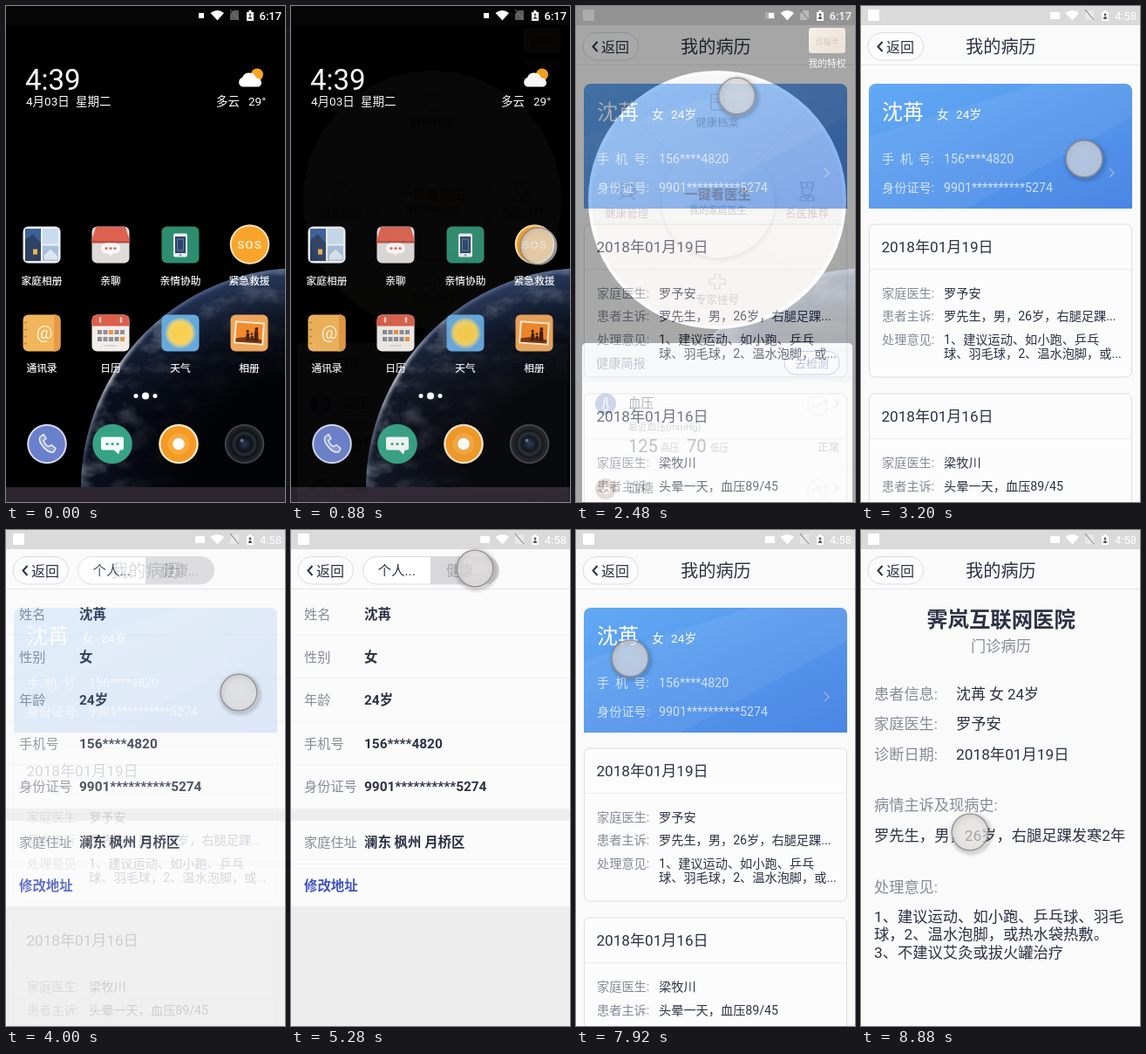
An HTML page for the animation above (8960 ms loop, 320 px wide and 568 px high).

```html
<!DOCTYPE html>
<html lang="zh-CN">
<head>
<meta charset="utf-8">
<title>健康应用演示</title>
<style>
html, body { margin: 0; width: 100%; height: 100%; overflow: hidden; background: #000; }
svg { display: block; }
text { font-family: Roboto, "Noto Sans CJK SC", "Noto Sans CJK", sans-serif; white-space: pre; }
.mid { text-anchor: middle; }
.b { font-weight: 700; }
.med { font-weight: 500; }
.ink { fill: #2c3245; }
.mute { fill: #878b98; }
.link { fill: #4355bd; }
.line { stroke: #ececef; }
.thin { fill: none; stroke-width: 1.2; stroke-linecap: round; stroke-linejoin: round; }

/* one 8960 ms loop, all parts share the clock */
#home, #health, #list, #info, #body, #detail, #touch { animation: 8960ms step-end infinite; }
#home { animation-name: home; }
#health { animation-name: health; }
#list { animation-name: list; }
#info { animation-name: info; }
#body { animation-name: body; }
#detail { animation-name: detail; }
#touch { animation-name: touch; }

@keyframes home {
  0% { opacity: 1; } 9.8% { opacity: .97; } 10.7% { opacity: .65; }
  11.6% { opacity: .3; } 12.47%, 100% { opacity: 0; }
}
@keyframes health {
  0% { opacity: 0; } 9.8% { opacity: .035; } 10.7% { opacity: .4; }
  11.6% { opacity: .75; } 12.47%, 100% { opacity: 1; }
}
@keyframes list {
  0% { opacity: 0; }
  24.08% { opacity: 0; animation-timing-function: steps(6); }
  29.43%, 100% { opacity: 1; }
}
@keyframes info {
  0% { opacity: 0; }
  40.15% { opacity: 0; animation-timing-function: steps(6); }
  45.5% { opacity: 1; }
  68%, 100% { opacity: 0; }
}
@keyframes body {
  0% { opacity: 0; } 63.36% { opacity: .35; } 65.15% { opacity: .75; } 66.93% { opacity: 1; }
  83% { opacity: .5; } 84.8%, 100% { opacity: 0; }
}
@keyframes detail {
  0% { opacity: 0; } 96.4% { opacity: .3; } 98.2% { opacity: .7; } 99.08%, 100% { opacity: 1; }
}
@keyframes touch {
  0% { opacity: 0; transform: translate(284px, 275px); }
  1.76% { opacity: .2; } 2.65% { opacity: .4; } 3.55% { opacity: .6; } 4.44% { opacity: .8; }
  5.33% { opacity: 1; transform: translate(284px, 275px); }
  14.26% { transform: translate(272px, 255px); }
  15.15% { transform: translate(245px, 207px); }
  16.05% { transform: translate(215px, 155px); }
  16.94% { transform: translate(193px, 117px); }
  18.73% { transform: translate(184.5px, 103px); }
  35.69% { transform: translate(256px, 175px); }
  36.58% { transform: translate(267px, 186px); }
  53.55% { transform: translate(234px, 76px); }
  54.44% { transform: translate(224px, 44px); }
  58.01% { transform: translate(217px, 44px); }
  58.9% { transform: translate(211px, 44px); }
  74.98% { transform: translate(189px, 43.5px); }
  75.87% { transform: translate(138px, 42px); }
  76.76% { transform: translate(83px, 41px); }
  77.66% { transform: translate(43px, 40px); }
  78.55% { transform: translate(28px, 40px); }
  88.37% { transform: translate(62px, 147px); }
  89.26% { transform: translate(106px, 285px); }
  91.05%, 100% { opacity: 1; transform: translate(125px, 346px); }
}
</style>
</head>
<body>
<svg width="320" height="568" viewBox="0 0 320 568">
<defs>
  <linearGradient id="sea" x1=".7" y1="0" x2=".25" y2=".6">
    <stop offset="0" stop-color="#2c4066"/><stop offset=".5" stop-color="#1f2f52"/><stop offset="1" stop-color="#0c1222"/>
  </linearGradient>
  <radialGradient id="night">
    <stop offset=".5" stop-color="#020306"/><stop offset=".75" stop-color="#03050a" stop-opacity=".8"/><stop offset=".93" stop-color="#05080f" stop-opacity=".3"/><stop offset="1" stop-color="#05080f" stop-opacity=".1"/>
  </radialGradient>
  <linearGradient id="limb" x1="0" y1="1" x2="1" y2="0">
    <stop offset=".26" stop-color="#7d96cc" stop-opacity=".25"/><stop offset=".34" stop-color="#c5d2ee" stop-opacity=".6"/><stop offset=".42" stop-color="#fff"/><stop offset=".52" stop-color="#b5c4e2" stop-opacity=".5"/><stop offset=".75" stop-color="#8ba2c8" stop-opacity=".35"/>
  </linearGradient>
  <linearGradient id="sky" x1="0" y1="0" x2="1" y2="1"><stop offset="0" stop-color="#62a9f4"/><stop offset="1" stop-color="#4a86e4"/></linearGradient>
  <linearGradient id="gold" x1="0" y1="0" x2="1" y2="1"><stop offset="0" stop-color="#eedcc0"/><stop offset="1" stop-color="#cfb089"/></linearGradient>
  <linearGradient id="cream" x1="0" y1="0" x2="0" y2="1"><stop offset="0" stop-color="#f4f0ee"/><stop offset="1" stop-color="#ece4e2"/></linearGradient>
  <radialGradient id="sun"><stop offset=".4" stop-color="#f8cf4e"/><stop offset=".75" stop-color="#f3d266"/><stop offset="1" stop-color="#cfcf96" stop-opacity=".3"/></radialGradient>
  <radialGradient id="lens"><stop offset="0" stop-color="#2c3a55"/><stop offset=".4" stop-color="#0e121a"/><stop offset=".6" stop-color="#2a2f38"/><stop offset=".7" stop-color="#101216"/><stop offset="1" stop-color="#26282d"/></radialGradient>
  <radialGradient id="tip"><stop offset="0" stop-color="#e2dfde" stop-opacity=".66"/><stop offset="1" stop-color="#d8d5d4" stop-opacity=".72"/></radialGradient>
  <filter id="clouds" x="0" y="0" width="1" height="1">
    <feTurbulence type="fractalNoise" baseFrequency=".03 .05" numOctaves="5" seed="4"/>
    <feColorMatrix values="0 0 0 0 .6  0 0 0 0 .66  0 0 0 0 .78  3 0 0 0 -1.4"/>
  </filter>
  <filter id="soft" x="-.3" y="-.3" width="1.6" height="1.6"><feGaussianBlur stdDeviation="2"/></filter>
  <clipPath id="globe"><circle cx="338" cy="552" r="252"/></clipPath>
  <clipPath id="pill"><rect x="82" y="30" width="157" height="32" rx="16"/></clipPath>
  <rect id="tile" x="-21.5" y="-21" width="43" height="42" rx="6"/>

  <g id="signals">
    <path d="M234.500 8Q242.500 2 250 8L242.500 16.500Z"/>
    <path d="M267 5v11h-10v-7l4-4Z" opacity=".35"/>
    <path d="M257 4l10 12" stroke="#777"/>
    <path d="M276 7h2.500v-2h3v2h2.500v10h-8Z"/>
    <path d="M278 15q0-3 2-3t2 3Z" fill="#555"/><circle cx="280" cy="10" r="1.400" fill="#555"/>
  </g>
  <g id="back">
    <rect x="8" y="30.500" width="63.500" height="31.500" rx="15.700" fill="#fcfcfc" stroke="#dcdce0"/>
    <path d="M24.500 41l-5 5.500 5 5.500" fill="none" stroke="#2c3245" stroke-width="2"/>
    <text x="29" y="53" font-size="16" class="ink">返回</text>
  </g>
  <g id="bar">
    <path d="M0 22h320v45H0Z" fill="#fafafa"/><path d="M0 67.500h320" stroke="#e6e6e9"/>
    <use href="#back"/>
  </g>
  <g id="titled">
    <use href="#bar"/><text x="120" y="53.500" font-size="20.200" class="ink">我的病历</text>
  </g>
  <g id="stamp" class="mid" transform="rotate(-20)" opacity=".3">
    <circle r="11.500" fill="none" stroke="#999"/><rect x="-15" y="-4.500" width="30" height="9" fill="#fff"/>
    <text y="2.500" font-size="7" fill="#888">示例数据</text>
  </g>
  <path id="next" d="M0-5l5 5-5 5" fill="none" stroke="#c9c9cf" stroke-width="1.300"/>
</defs>

<!-- wallpaper and dark status bar -->
<rect width="320" height="568"/>
<g clip-path="url(#globe)">
  <rect x="80" y="290" width="240" height="278" fill="url(#sea)"/>
  <rect x="80" y="290" width="240" height="278" filter="url(#clouds)" opacity=".4"/>
  <circle cx="338" cy="552" r="252" fill="url(#night)"/>
  <circle cx="338" cy="552" r="252" fill="none" stroke="url(#limb)" stroke-width="5" filter="url(#soft)"/>
</g>
<rect width="320" height="22" fill="#060606"/>
<g fill="#fff">
  <rect x="221" y="8" width="6" height="6"/>
  <use href="#signals"/><text x="290.500" y="15.500" font-size="13" class="med">6:17</text>
</g>

<g id="home">
  <g fill="#fff">
    <text x="22" y="95.500" font-size="33">4:39</text>
    <g font-size="13.500">
      <text x="23" y="114">4月03日</text><text x="80" y="114">星期二</text>
      <text x="241" y="114">多云</text><text x="278" y="114">29°</text>
    </g>
    <circle cx="288" cy="78.500" r="7" fill="#f6a623"/>
    <path d="M271 92.500a5.500 5.500 0 0 1 0-10.500 8.500 8.500 0 0 1 16 .5 5.300 5.300 0 0 1 3 10Z"/>
    <g class="mid med" font-size="11.700" stroke="#fff" stroke-width=".2">
      <text x="41" y="318.500">家庭相册</text><text x="120" y="318.500">亲聊</text>
      <text x="200" y="318.500">亲情协助</text><text x="279" y="318.500">紧急救援</text>
      <text x="41" y="419">通讯录</text><text x="120" y="419">日历</text>
      <text x="200" y="419">天气</text><text x="279" y="419">相册</text>
    </g>
    <circle cx="149" cy="446.500" r="2.500"/><circle cx="160" cy="446.500" r="4"/><circle cx="171" cy="446.500" r="2.500"/>
  </g>

  <g transform="translate(41 273.500)">
    <use href="#tile" fill="#eef1f5"/>
    <path d="M-19-18.500H-1V-1h-18Z" fill="#3c6199"/><path d="M1-18.500h18V-1H1Z" fill="#c9dcef"/>
    <path d="M-19 1H-1v17.500h-18Z" fill="#24456f"/><path d="M1 1h18v17.500H1Z" fill="#a9c0da"/>
    <path d="M-19-6l9-6 9 10v20.500h-18Z" fill="#2f4266"/><path d="M-10 5h5v6h-5Z" fill="#efb44c"/><path d="M3 12l7-7 8 8v4H3Z" fill="#dbe6ee"/>
  </g>
  <g transform="translate(120 273.500)">
    <use href="#tile" fill="#dedbd8"/>
    <path d="M-17-20.500h34l5 16h-44Z" fill="#dd6350"/><path d="M-22-4.500h44v2.500h-44Z" fill="#b94e3f"/>
    <rect x="-11" y="-2" width="22" height="12" rx="6" fill="#fafafa"/><path d="M-3 9h6l-3 4Z" fill="#fafafa"/>
    <g fill="#df6a50"><circle cx="-5" cy="4" r="1.600"/><circle cy="4" r="1.600"/><circle cx="5" cy="4" r="1.600"/></g>
  </g>
  <g transform="translate(200 273.500)">
    <use href="#tile" fill="#2e8d6f"/>
    <rect x="-8" y="-13" width="16" height="27" rx="2" fill="#e8eef0"/><rect x="-6" y="-9.500" width="12" height="19" fill="#2d4668"/>
    <rect x="-3.500" y="-6.500" width="7" height="13" fill="none" stroke="#5f7ea8"/><circle cy="11.700" r="1.200" fill="#8a9aa8"/>
  </g>
  <g transform="translate(279.500 273)">
    <circle r="22.800" fill="#fbe3bd"/><circle r="20.800" fill="#f9a52c"/>
    <text y="4.800" class="mid med" font-size="13.500" fill="#fdf0d6" letter-spacing="1">SOS</text>
  </g>
  <g transform="translate(41 374.500)">
    <use href="#tile" fill="#f1b55c"/><path d="M-20-12h3m-3 8h3m-3 8h3m-3 8h3" stroke="#c08a3c" stroke-width="1.500"/>
    <path d="M14-21h1.500a6 6 0 0 1 6 6v30a6 6 0 0 1-6 6H14Z" fill="#e59a44"/>
    <text x="3" y="6.500" class="mid" font-size="21" fill="#fff4df">@</text>
  </g>
  <g transform="translate(120 374.500)">
    <use href="#tile" fill="#f1eeea"/><path d="M-21.500-8v-7a6 6 0 0 1 6-6h31a6 6 0 0 1 6 6v7Z" fill="#dc5f4c"/>
    <path d="M-12-17v4m24-4v4" stroke="#f3d0c8" stroke-width="2.500" stroke-linecap="round"/>
    <path d="M-15-1h31M-15 7h31" stroke="#8f9096" stroke-width="5" stroke-dasharray="5 1.500"/>
    <path d="M-2-1h5m8 8h5" stroke="#ef9440" stroke-width="5"/><path d="M-7 14.500h14" stroke="#c5c2be"/>
  </g>
  <g transform="translate(200 374.500)"><use href="#tile" fill="#66a9dc"/><circle r="17.500" fill="url(#sun)"/></g>
  <g transform="translate(279 374.500)">
    <use href="#tile" fill="#eda65c"/>
    <g transform="rotate(4)">
      <rect x="-17" y="-13" width="34" height="26" fill="#fbe9cf"/><rect x="-15" y="-11" width="30" height="22" fill="#f28a2e"/>
      <path d="M-15 7q15-4 30 0v4h-30Z" fill="#7a3a16"/>
      <g fill="#4a2310"><circle cx="-2" cy="-2" r="1.600"/><circle cx="8" cy="-5" r="2"/><circle cx="3" cy="1" r="1.400"/><path d="M-4 9l1-9h3l1 9Zm6 0v-6h3v6Zm4 0V-3h4l1 12Z"/></g>
    </g>
  </g>

  <g transform="translate(47 501.500)">
    <circle r="22.800" fill="#d5daee"/><circle r="20.800" fill="#6b80cd"/>
    <path d="M-8-8c-3 6 9 20 16 17l2-4-5-4-3 2c-3-1-5-4-6-7l3-2-3-5Z" fill="#8b9cdb" stroke="#f1f3fc" stroke-width="1.500" stroke-linejoin="round"/>
  </g>
  <g transform="translate(122 501.500)">
    <circle r="22.800" fill="#35a384"/><rect x="-13" y="-8" width="26" height="15" rx="2" fill="#f4faf8"/><path d="M1 6h8l-2 6Z" fill="#f4faf8"/>
    <g fill="#35a384"><circle cx="-6" r="1.600"/><circle r="1.600"/><circle cx="6" r="1.600"/></g>
  </g>
  <g transform="translate(198 501.500)"><circle r="22.800" fill="#fbe9cd"/><circle r="20.500" fill="#f59a23"/><circle r="12.500" fill="#f7a93f"/><circle r="6.800" fill="#fff"/></g>
  <g transform="translate(273.500 501.500)"><circle r="22.800" fill="#41444b"/><circle r="21" fill="url(#lens)"/><circle cx="-3" cy="-4" r="2" fill="#7f93b5" opacity=".7"/></g>
  <path d="M0 551h320v17H0Z" fill="#2d2631"/>
</g>

<g id="health">
  <rect x="267" y="25" width="42" height="29" rx="3" fill="url(#gold)"/>
  <g class="mid"><text x="288" y="44" font-size="9" fill="#8a5a2c">诊福卡</text><text x="288" y="70" font-size="10.800" fill="#fff">我的特权</text></g>
  <g transform="translate(162 222)">
    <circle r="146" fill="url(#cream)" stroke="#fff" stroke-width="4"/>
    <path d="M-103-103L103 103M-103 103L103-103" stroke="#e0d7d4"/>
    <circle cx="1.500" cy="4" r="65.500" fill="#9a837a" opacity=".4" filter="url(#soft)"/>
    <circle r="65" cx="1" cy="1" fill="#f3eeeb"/>
  </g>
  <g class="mid">
    <text x="162.500" y="221" font-size="15.300" class="b" fill="#b8691f">一键看医生</text>
    <text x="163" y="238" font-size="10.900" fill="#7b706d">我的家庭医生</text>
    <g font-size="12.500" fill="#877973">
      <text x="162" y="138">健康档案</text><text x="58" y="242">健康管理</text>
      <text x="265" y="242">名医推荐</text><text x="162" y="341">专家挂号</text>
    </g>
  </g>
  <g class="thin" stroke="#a6958d">
    <path d="M155 101h15v18h-15ZM158 106h8M158 110h5"/>
    <circle cx="58" cy="210" r="8"/><path d="M50 207q9 2 12-4 1 4 4 5M48 208v5M68 208v5q0 4-7 4M49 222q2-3 6-4M61 218q5 1 6 4"/>
    <path d="M259 208l-1.500-6h15l-1.500 6ZM265 203.500v3M259.500 208v3a5.500 5.500 0 0 0 11 0v-3M257 223v-3q1-3 8-3t8 3v3ZM262 218l3 3 3-3"/>
    <path d="M159 307h6v5.500h6v6h-6v5.500h-6v-5.500h-6v-6h6Z"/>
  </g>
  <path d="M7 568V391a5 5 0 0 1 5-5h300a5 5 0 0 1 5 5v177Z" fill="#fcfcfd"/>
  <path d="M7 431v-40a5 5 0 0 1 5-5h300a5 5 0 0 1 5 5v40Z" fill="#eeeff7"/>
  <text x="23" y="414" font-size="14.200" fill="#555a70">健康简报</text>
  <rect x="239" y="395.500" width="63" height="26.500" rx="13" fill="#f5f6fc" stroke="#6b78b6"/>
  <text x="270.500" y="413.500" class="mid" font-size="13" fill="#3d4fa3">去检测</text>
  <circle cx="34" cy="455.500" r="12" fill="#7489c1"/><circle cx="34" cy="553" r="12" fill="#b59c8a"/>
  <path d="M32.500 457v-7a1.500 1.500 0 0 1 3 0v7a3 3 0 1 1-3 0Z" class="thin" stroke="#fff"/>
  <path d="M34 546.500q8 8 3 11.500-3 1.500-6 0-5-3.500 3-11.500Z" fill="#f7f2ee"/><circle cx="34" cy="555" r="1.300" fill="#b59c8a"/>
  <g font-size="14.500" class="med" fill="#272a34"><text x="60" y="460">血压</text><text x="60" y="557">血糖</text></g>
  <use href="#stamp" transform="translate(277 458)"/><use href="#stamp" transform="translate(277 554)"/>
  <use href="#next" transform="translate(296 455)"/><use href="#next" transform="translate(296 552)"/>
  <g fill="#8c8c94">
    <g font-size="10.800"><text x="60" y="486">最近血压(mmHg)</text><text x="97" y="510">高压</text><text x="154" y="510">低压</text></g>
    <text x="277" y="510" font-size="12.500">正常</text>
    <g font-size="20" fill="#4a4b58"><text x="60" y="511">125</text><text x="127" y="511">70</text></g>
  </g>
  <path d="M56 530.500h261" class="line"/>
</g>

<g id="list">
  <rect width="320" height="568" fill="#fafafa"/>
  <rect width="320" height="22" fill="#dadadb"/>
  <g fill="#fff"><rect x="8" y="4" width="13" height="13" rx="1"/><rect x="217" y="7" width="11" height="8" rx="1"/><use href="#signals"/><text x="291" y="15.500" font-size="13">4:58</text></g>
  <use href="#titled"/>
  <path d="M9 232V97a8 8 0 0 1 8-8h286a8 8 0 0 1 8 8v135Z" fill="url(#sky)"/>
  <path d="M9 150L200 89h103a8 8 0 0 1 8 8v30L120 232H9Z" fill="#fff" opacity=".06"/>
  <g fill="#fff">
    <text x="24" y="130" font-size="24">沈苒</text>
    <text x="87" y="129" font-size="13.700">女</text><text x="109" y="129" font-size="13.700">24岁</text>
    <g font-size="14.200" opacity=".72">
      <text x="24" y="180" word-spacing="3.300">手 机 号:</text><text x="24" y="213">身份证号:</text>
      <text x="95" y="180">156****4820</text><text x="95" y="213">9901**********5274</text>
    </g>
  </g>
  <use href="#next" transform="translate(285 191)" opacity=".7"/>
  <g fill="#fcfcfc" stroke="#dddee3"><rect x="9.500" y="250" width="301" height="175" rx="6"/><rect x="9.500" y="444" width="301" height="180" rx="6"/></g>
  <path d="M10 301.500h300M10 495.500h300" class="line"/>
  <g class="ink" font-size="17.100"><text x="23.500" y="282">2018年01月19日</text><text x="23.500" y="476">2018年01月16日</text></g>
  <g class="mute" font-size="14.200">
    <text x="24" y="333.500">家庭医生:</text><text x="24" y="360">患者主诉:</text><text x="24" y="386.500">处理意见:</text>
    <text x="24" y="528">家庭医生:</text><text x="24" y="554.500">患者主诉:</text>
  </g>
  <g class="ink" font-size="14.200">
    <text x="95" y="333.500">罗予安</text><text x="95" y="360">罗先生，男，26岁，右腿足踝...</text>
    <text x="95" y="386.500">1、建议运动、如小跑、乒乓</text><text x="95" y="403">球、羽毛球，2、温水泡脚，或...</text>
    <text x="95" y="528">梁牧川</text><text x="95" y="554.500">头晕一天，血压89/45</text>
  </g>
</g>

<g id="info">
  <rect y="22" width="320" height="546" fill="#ededed"/>
  <path d="M0 67h320v252H0ZM0 333h320v98H0Z" fill="#fbfbfb"/>
  <use href="#bar"/>
  <g clip-path="url(#pill)"><path d="M82 30h78v32H82Z" fill="#fff"/><path d="M160 30h79v32h-79Z" fill="#d8d8db"/></g>
  <rect x="82.500" y="30.500" width="156" height="31.500" rx="15.700" fill="none" stroke="#dadade"/>
  <g font-size="15.500"><text x="99.500" y="52" class="ink">个人...</text><text x="178" y="52" fill="#a2a3aa">健康...</text></g>
  <path d="M0 120.500h320M0 169.500h320M0 219.500h320M0 268.500h320M0 382.500h320" stroke="#f2f2f3"/>
  <g class="mute" font-size="15.200">
    <text x="15" y="101.500">姓名</text><text x="15" y="151">性别</text><text x="15" y="200">年龄</text>
    <text x="15" y="249.500">手机号</text><text x="15" y="299">身份证号</text><text x="15" y="363">家庭住址</text>
  </g>
  <g class="ink b" font-size="15.400">
    <text x="84" y="101.500">沈苒</text><text x="84" y="151">女</text><text x="84" y="200">24岁</text>
    <text x="84" y="249.500">156****4820</text><text x="84" y="299">9901**********5274</text><text x="84" y="363">澜东 枫州 月桥区</text>
    <text x="15" y="412.500" class="link">修改地址</text>
  </g>
</g>

<g id="body">
  <rect y="22" width="320" height="546" fill="#fbfbfb"/>
  <use href="#bar"/>
  <g clip-path="url(#pill)"><path d="M82 30h79v32H82Z" fill="#d8d8db"/><path d="M161 30h78v32h-78Z" fill="#fff"/></g>
  <rect x="82.500" y="30.500" width="156" height="31.500" rx="15.700" fill="none" stroke="#dadade"/>
  <g font-size="15.500"><text x="99.500" y="52" fill="#a2a3aa">个人...</text><text x="178" y="52" class="ink">健康...</text></g>
  <path d="M0 251h320v9H0ZM0 499h320v9H0Z" fill="#ececec"/>
  <path d="M0 120.500h320M0 310.500h320M0 558.500h320" class="line"/>
  <g class="ink b" font-size="16.100"><text x="15" y="102">一般信息</text><text x="15" y="292">身体情况</text><text x="15" y="540">疾病信息</text></g>
  <g fill="#9c9fa9" font-size="14.200">
    <text x="15" y="150">身高:</text><text x="168" y="150">体重:</text><text x="15" y="208">体质指数:</text>
    <text x="15" y="340">月经周期:</text><text x="15" y="398">月经量:</text><text x="15" y="456">自感症状:</text>
  </g>
  <g class="ink" font-size="16.100">
    <text x="15" y="175">162  cm</text><text x="168" y="175">46  kg</text><text x="15" y="232.500">17.53  kg/㎡</text>
    <text x="15" y="364.500">一般两个月到三个月</text><text x="15" y="422.500">量少</text><text x="15" y="481">正常</text>
  </g>
</g>

<g id="detail">
  <rect y="22" width="320" height="546" fill="#fafafa"/>
  <use href="#titled"/>
  <text x="160.500" y="110.500" class="ink b mid" font-size="24.400">霁岚互联网医院</text>
  <text x="160.500" y="138.500" class="mute mid" font-size="17.200">门诊病历</text>
  <g class="mute" font-size="17.200">
    <text x="15" y="194">患者信息:</text><text x="15" y="228">家庭医生:</text><text x="15" y="262.500">诊断日期:</text>
    <text x="15" y="321">病情主诉及现病史:</text><text x="15" y="414.500">处理意见:</text>
  </g>
  <g class="ink" font-size="17.300">
    <text x="109" y="194" font-size="16.900">沈苒 女 24岁</text><text x="109" y="228">罗予安</text><text x="109" y="262.500">2018年01月19日</text>
    <text x="15" y="355.500">罗先生，男，26岁，右腿足踝发寒2年</text>
    <text x="15" y="448.500">1、建议运动、如小跑、乒乓球、羽毛</text><text x="15" y="469">球，2、温水泡脚，或热水袋热敷。</text>
    <text x="15" y="489.500">3、不建议艾灸或拔火罐治疗</text>
  </g>
</g>

<g id="touch">
  <circle cx="1.500" cy="2" r="21.500" fill="none" stroke="#000" stroke-opacity=".35" stroke-width="2.500" filter="url(#soft)"/>
  <circle r="20.800" fill="url(#tip)" stroke="#918e8d" stroke-width="1.200"/>
</g>
</svg>
</body>
</html>
```
